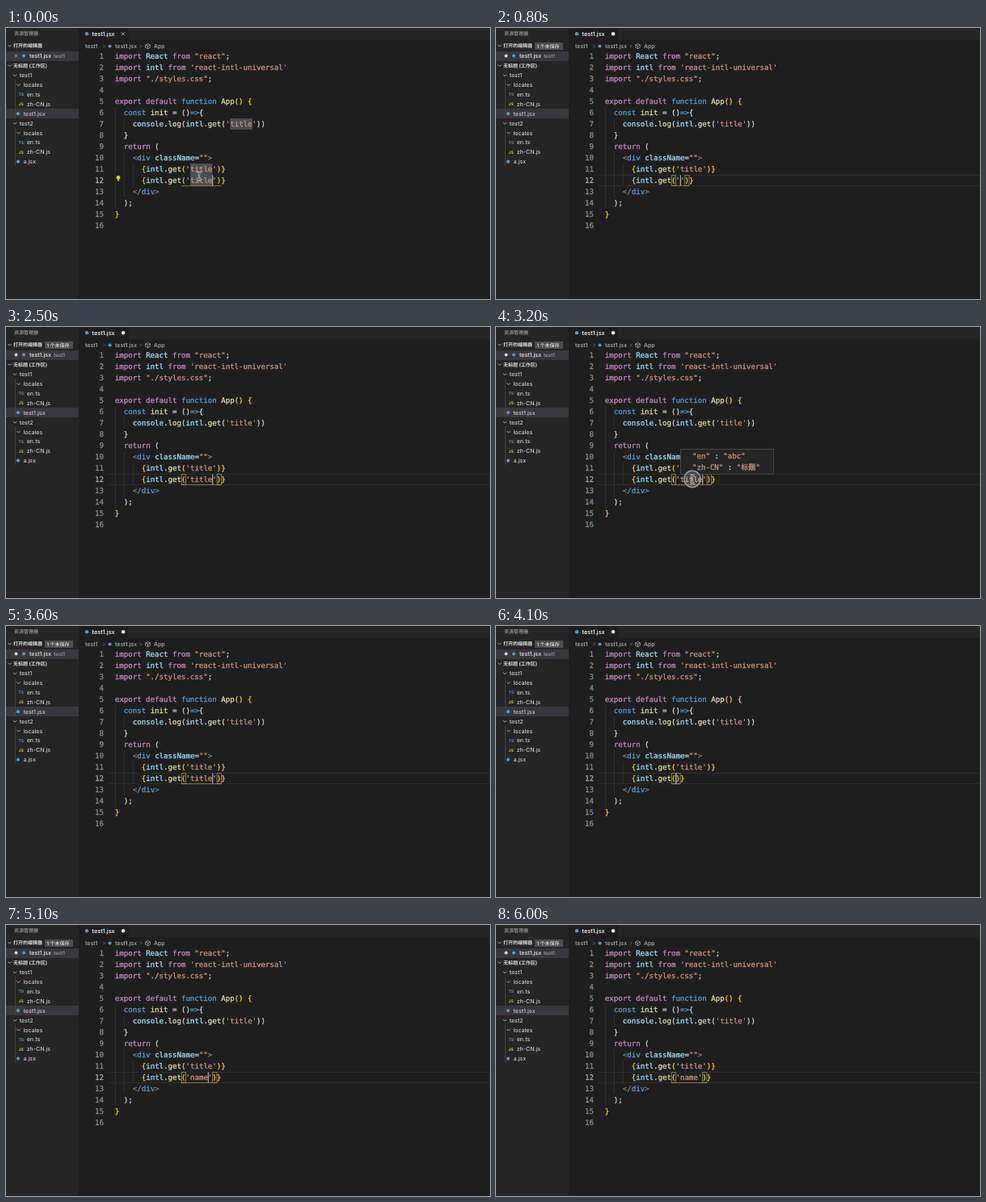
These frames come from a looping animation (599 by 336 pixels, 6.1 s). An HTML page:

```html
<!DOCTYPE html>
<html lang="zh">
<head>
<meta charset="utf-8">
<style>
html, body { margin: 0; width: 100%; height: 100%; overflow: hidden; background: #1e1e1e; }
svg { display: block; width: 599px; height: 336px; }
text { white-space: pre; text-rendering: geometricPrecision; }
.code { font: 9.11px "DejaVu Sans Mono", "Noto Sans CJK SC", monospace; stroke-width: 0.28px; }
.ui { font: 500 7px Inter, "Noto Sans CJK SC", "Noto Sans CJK", sans-serif; }
</style>
</head>
<body>
<svg id="stage" viewBox="0 0 599 336"><g id="back"></g><g id="live"></g></svg>
<script>
const CW = 5.485, X0 = 134.8, LOOP = 6100;
const lineTop = n => 28 + (n - 1) * 14;
const col = n => X0 + n * CW;
const C = { k: '#c586c0', v: '#9cdcfe', s: '#ce9178', w: '#d4d4d4', b: '#569cd6',
  f: '#dcdcaa', g: '#f0cc45', t: '#808080', a: '#4aa5f0' };
const ICON = '#4b9fc4';

const esc = s => s.replace(/&/g, '&amp;').replace(/</g, '&lt;').replace(/>/g, '&gt;');
const rect = (x, y, w, h, fill, stroke = 'none', sw = 1) =>
  `<rect x="${x}" y="${y}" width="${w}" height="${h}" fill="${fill}" stroke="${stroke}" stroke-width="${sw}"/>`;
const path = (d, stroke, w = 0.8) =>
  `<path d="${d}" fill="none" stroke="${stroke}" stroke-width="${w}"/>`;
const dot = (x, y, r, fill) => `<circle cx="${x}" cy="${y}" r="${r}" fill="${fill}"/>`;
const ui = (x, y, s, fill = '#cccccc', size = 7, more = '') =>
  `<text class="ui" x="${x}" y="${y + size * 0.36}" fill="${fill}" style="font-size:${size}px;${more}">${esc(s)}</text>`;
// parts: [colour key, text, colour key, text, ...]
function code(x, y, parts) {
  let out = '';
  for (let i = 0; i < parts.length; i += 2) {
    const c = C[parts[i]];
    out += `<tspan fill="${c}" stroke="${c}">${esc(parts[i + 1])}</tspan>`;
  }
  return `<text class="code" x="${x}" y="${y}">${out}</text>`;
}
const down = (x, y) => path(`M${x - 2.2} ${y - 1.1}l2.2 2.2l2.2-2.2`, '#cccccc');
const right = (x, y) => path(`M${x - 1} ${y - 1.8}l1.8 1.8l-1.8 1.8`, '#9a9a9a', 0.7);
const cross = (x, y) => path(`M${x - 2} ${y - 2}l4 4m0-4l-4 4`, '#d0d0d0');

const call = s => ['g', '{', 'v', 'intl', 'w', '.', 'f', 'get', 'g', '(', 's', s, 'g', ')}'];
const program = [
  [0, ['k', 'import ', 'v', 'React ', 'k', 'from ', 's', '"react"', 'w', ';']],
  [0, ['k', 'import ', 'v', 'intl ', 'k', 'from ', 's', "'react-intl-universal'"]],
  [0, ['k', 'import ', 's', '"./styles.css"', 'w', ';']],
  null,
  [0, ['k', 'export default ', 'b', 'function ', 'f', 'App', 'g', '() {']],
  [2, ['b', 'const ', 'f', 'init ', 'w', '= ()', 'b', '=>', 'w', '{']],
  [4, ['v', 'console', 'w', '.', 'f', 'log', 'w', '(', 'v', 'intl', 'w', '.', 'f', 'get',
    'w', '(', 's', "'title'", 'w', '))']],
  [2, ['w', '}']],
  [2, ['k', 'return ', 'w', '(']],
  [4, ['t', '<', 'b', 'div ', 'v', 'className', 'w', '=', 's', '""', 't', '>']],
  [6, call("'title'")],
  null,
  [4, ['t', '</', 'b', 'div', 't', '>']],
  [2, ['w', ');']],
  [0, ['g', '}']],
  null
];

function chrome() {
  let o = rect(0, 0, 90, 336, '#252526') + rect(90, 0, 509, 15, '#252526') +
    rect(90, 0, 61.5, 15, '#1e1e1e') +
    rect(0, 29, 90, 12, '#37373d') + rect(0, 100, 90, 12, '#37373d');
  o += ui(10, 7, '资源管理器', '#bbbbbb', 6) + down(4.5, 22) +
    ui(9, 22, '打开的编辑器', '#dddddd', 6, 'font-weight:700') +
    down(4.5, 46.5) + ui(9, 46.5, '无标题 (工作区)', '#dddddd', 6, 'font-weight:700');
  o += dot(22, 34.5, 2.1, ICON) + ui(29, 34.5, 'test1.jsx', '#eeeeee') +
    ui(59, 34.5, 'test1', '#a5a5a5', 6.3);
  o += path('M11.5 64.5V112M11.5 124V171', '#484848', 0.8);
  const tree = ['>test1', '>>locales', 'TS en.ts', 'JS zh-CN.js', '* test1.jsx',
    '>test2', '>>locales', 'TS en.ts', 'JS zh-CN.js', '* a.jsx'];
  tree.forEach((row, i) => {
    const y = 58.6 + i * 11.9;
    if (row[0] === '>') {
      const deep = row[1] === '>';
      o += down(deep ? 15.5 : 11, y) + ui(deep ? 21.5 : 16.7, y, row.replace(/>/g, ''));
    } else {
      const [kind, name] = row.split(' ');
      if (kind === '*') o += dot(15, y, 2.1, ICON) + ui(21.5, y, name);
      else o += ui(15.5, y, kind, kind === 'TS' ? '#519aba' : '#cbcb41', 5, 'font-weight:700') +
        ui(25.7, y, name);
    }
  });
  o += dot(100, 7.3, 2.2, ICON) + ui(106.5, 7.3, 'test1.jsx', '#ffffff', 7.3);
  o += ui(98, 22.5, 'test1', '#b0b0b0') + right(121.3, 22.5) + dot(128.5, 22.5, 2.1, ICON) +
    ui(135, 22.5, 'test1.jsx', '#b0b0b0') + right(167, 22.5) +
    path('M175.5 19.5l2.8 1.5v3.2l-2.8 1.5l-2.8-1.5v-3.2zm-2.8 1.5l2.8 1.4l2.8-1.4m-2.8 1.4v3.2', '#b8b8b8', 0.7) +
    ui(183, 22.5, 'App', '#b0b0b0');
  return o;
}

function codeLines() {
  const guide = (n, a, b) => path(`M${col(n) + 0.5} ${lineTop(a)}V${lineTop(b + 1)}`, '#404040', 0.6);
  let o = guide(0, 6, 14) + guide(2, 7, 7) + guide(2, 10, 13) + guide(4, 11, 12);
  program.forEach((line, i) => {
    const y = lineTop(i + 1) + 10.3, c = i === 11 ? '#a8a8a8' : '#8c8c8c';
    o += `<text class="code" x="121" y="${y}" text-anchor="end" fill="${c}" stroke="${c}">${i + 1}</text>`;
    if (line) o += code(col(line[0]), y, line[1]);
  });
  return o;
}
const listing = codeLines();

// [start ms, argument text, caret offset inside it]
const edits = [[0, "'title'", 6], [600, "''", 1], [1600, "'t'", 2], [2000, "'title'", 6],
  [3700, "''", 1], [4000, '', 0], [4300, "''", 1], [4600, "'n'", 2], [4700, "'na'", 3],
  [4800, "'name'", 5]];
// [from, to, items, typed letters]
const popups = [[1000, 1600, ['title', 'name'], 0], [1600, 2000, ['title'], 1],
  [3700, 3900, ['title', 'name'], 0], [4400, 4600, ['title', 'name'], 0],
  [4600, 4800, ['name'], 1], [4800, 4900, ['name'], 4]];
// [from, to, English, Chinese]
const tips = [[200, 500, 'abc', '标题'], [3000, 3600, 'abc', '标题'], [5300, 5900, 'name', '名称']];
// [from, to, x1, y1, x2, y2, ring]
const moves = [[0, 400, 239, 184, 241, 188, 0], [400, 600, 241, 188, 242, 194, 1],
  [2900, 3100, 247, 208, 243, 188.5, 0], [3100, 3500, 243, 188.5, 243, 188.5, 1],
  [3500, 3600, 243, 188.5, 246, 200, 0], [5200, 5400, 245, 213, 242, 189, 0],
  [5400, 5700, 242, 189, 242, 189, 1], [5700, 6000, 242, 189, 246, 222, 0]];
const during = (list, t) => list.find(e => t >= e[0] && t < e[1]);

function pointer([a, b, x1, y1, x2, y2, ring], t) {
  const p = (t - a) / (b - a), x = x1 + (x2 - x1) * p, y = y1 + (y2 - y1) * p;
  const beam = `M${x - 3} ${y - 5}q3 0 3 2v6q0 2-3 2m6-10q-3 0-3 2m0 6q0 2 3 2`;
  const halo = `<circle cx="${x}" cy="${y}" r="10.2" fill="#fff" fill-opacity=".16" stroke="#9a9a9a" stroke-width="1.4"/>`;
  return (ring ? halo : '') + path(beam, '#f0f0f0', 2.2) + path(beam, '#222', 0.9);
}

function popup([, , items, typed], x) {
  const y = 196;
  let o = rect(x, y, 231, items.length * 14, '#252526') + rect(x, y, 231, 14, '#062f4a');
  items.forEach((name, i) => {
    const cy = y + 7 + i * 14;
    o += path(`M${x + 4} ${cy - 2.5}h-1.5v5h1.5m4-5h1.5v5h-1.5`, '#75beff') +
      `<circle cx="${x + 6}" cy="${cy}" r="1.4" fill="none" stroke="#75beff" stroke-width=".8"/>` +
      code(x + 12.7, cy + 2.9, ['a', name.slice(0, typed), 'w', name.slice(typed)]);
  });
  return o;
}

const tip = ([, , en, zh]) => rect(228.5, 151.5, 115, 31, '#252526', '#454545') +
  code(243, 163.2, ['s', '"en"', 'w', ' : ', 's', `"${en}"`]) +
  code(243, 176.9, ['s', '"zh-CN"', 'w', ' : ', 's', `"${zh}"`]);

function frame(time) {
  const t = Math.floor(time / 100) * 100;
  const [, arg, caret] = edits.filter(e => e[0] <= t).pop();
  const dirty = t >= 600, y = lineTop(12), open = col(15), close = col(16 + arg.length);
  let o = '';
  if (dirty) {
    o += dot(12.5, 34.5, 2, '#d8d8d8') + dot(145, 7.3, 2.2, '#eeeeee') +
      rect(48, 18, 35, 9, '#4d4d4d') + ui(50.5, 22.4, '1 个未保存', '#ffffff', 6) +
      path(`M126 ${y + 0.5}H599M126 ${y + 13.5}H599`, '#2b2b2b', 1);
  } else {
    o += cross(12.5, 34.5) + cross(145, 7.3);
    [[7, 26], [11, 17], [12, 17]].forEach(([n, c]) => {
      o += rect(col(c), lineTop(n), CW * 5, 14, '#494e54');
    });
    o += dot(139, 185.5, 2.4, '#ffcc00') + rect(137.8, 187.6, 2.4, 2, '#d9ad00');
  }
  o += listing + code(col(6), y + 10.3, call(arg)) +
    path(`M${open} ${y + 13.7}H${close + CW}`, '#b58a4a', 0.8);
  if (dirty) [open, close].forEach(x => {
    o += rect(x + 0.2, y + 0.7, CW - 0.2, 12.8, 'none', '#a8924a', 0.8);
  });
  if (t < 5900) o += rect(col(16 + caret) - 0.2, y + 0.5, 1, 13, '#c8c8c8');
  const list = during(popups, t), hint = during(tips, t), move = during(moves, t);
  if (list) o += popup(list, Math.round(col(16 + caret)));
  if (hint) o += tip(hint);
  if (move) o += pointer(move, t);
  return o;
}

document.getElementById('back').innerHTML = chrome();
const live = document.getElementById('live');
const start = performance.now();
let last = -1;
function tick() {
  const time = (performance.now() - start) % LOOP, step = Math.floor(time / 100);
  if (step !== last) {
    last = step;
    live.innerHTML = frame(time);
  }
  requestAnimationFrame(tick);
}
tick();
</script>
</body>
</html>
```
